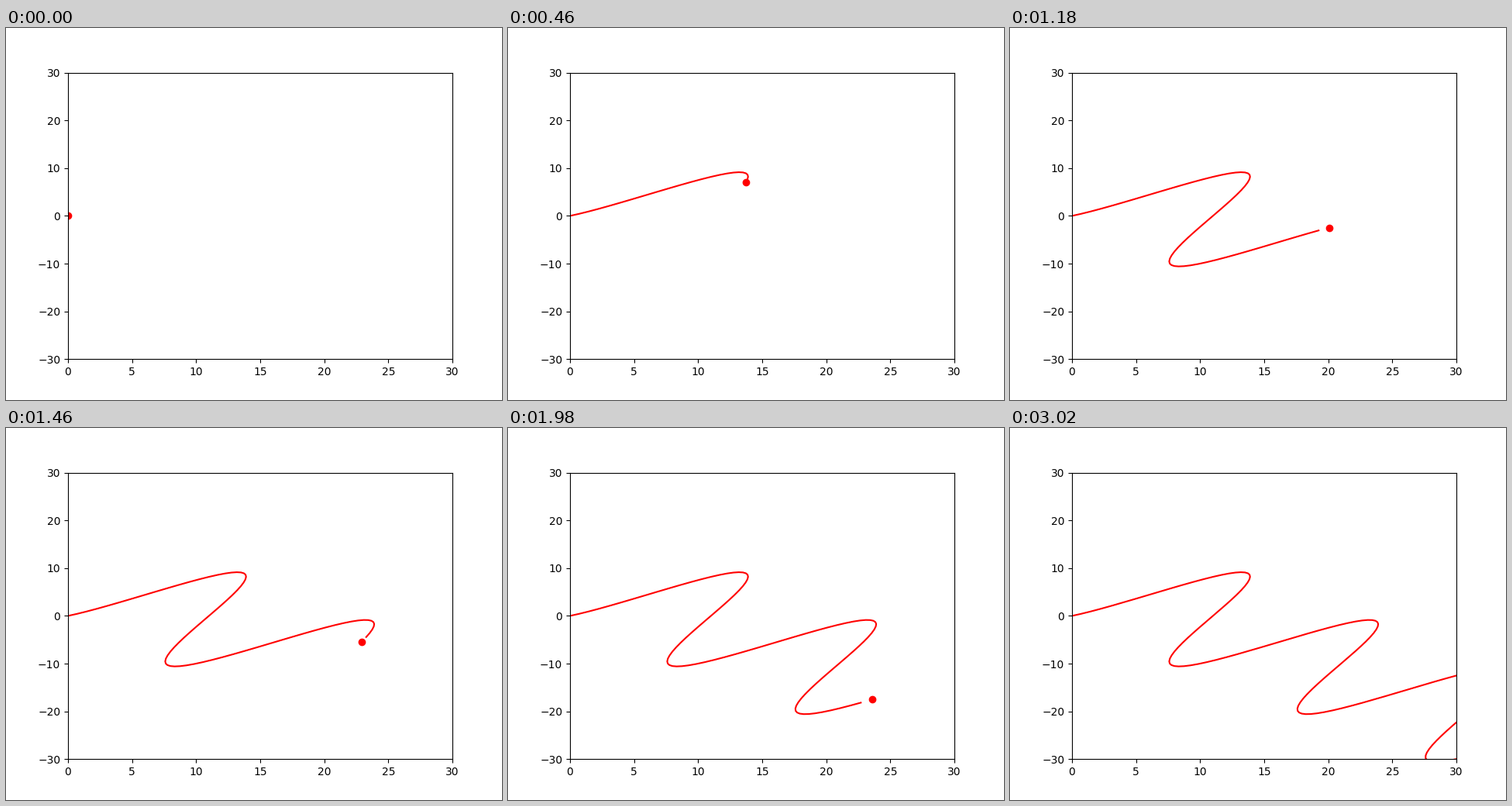
These frames come from a looping animation (640x480 px, 4.67 s). A matplotlib script:

```python
import numpy as np
import matplotlib.pyplot as plt
from matplotlib.animation import FuncAnimation

INTERVAL = 10          # ms per tick
TICKS = 467
TICKS_PER_STEP = 2
STEP = 0.133           # phase advance per step
DRIFT = 5 / np.pi      # ten units per turn
EXIT_STEP = 108        # the dot has left through the right edge
RETURN_SLOT, RETURN_STEP = 134, 126
LAST_STEP = 143


def swing(phase, amplitude, lag):
    """Oscillation that starts at zero."""
    return amplitude * (np.sin(phase - lag) + np.sin(lag))


phase = STEP * np.arange(LAST_STEP + 1)
x = DRIFT * phase + swing(phase, 5.42, 0.913)
y = -DRIFT * phase + swing(phase, 7.19, 0.928)

fig, ax = plt.subplots(figsize=(6.4, 4.8), dpi=100)
ax.set_xlim(0, 30)
ax.set_ylim(-30, 30)
trail, = ax.plot([], [], "r-", lw=1.5)
dot, = ax.plot([], [], "ro", ms=6)


def step_at(tick):
    slot = tick // TICKS_PER_STEP
    if slot < RETURN_SLOT:
        return min(slot, EXIT_STEP)
    return min(slot - RETURN_SLOT + RETURN_STEP, LAST_STEP)


def update(tick):
    n = step_at(tick)
    trail.set_data(x[:n], y[:n])
    dot.set_data(x[n:n + 1], y[n:n + 1])
    return trail, dot


anim = FuncAnimation(fig, update, frames=TICKS, interval=INTERVAL,
                     init_func=lambda: update(0), repeat=True, repeat_delay=0)
plt.show()
```
